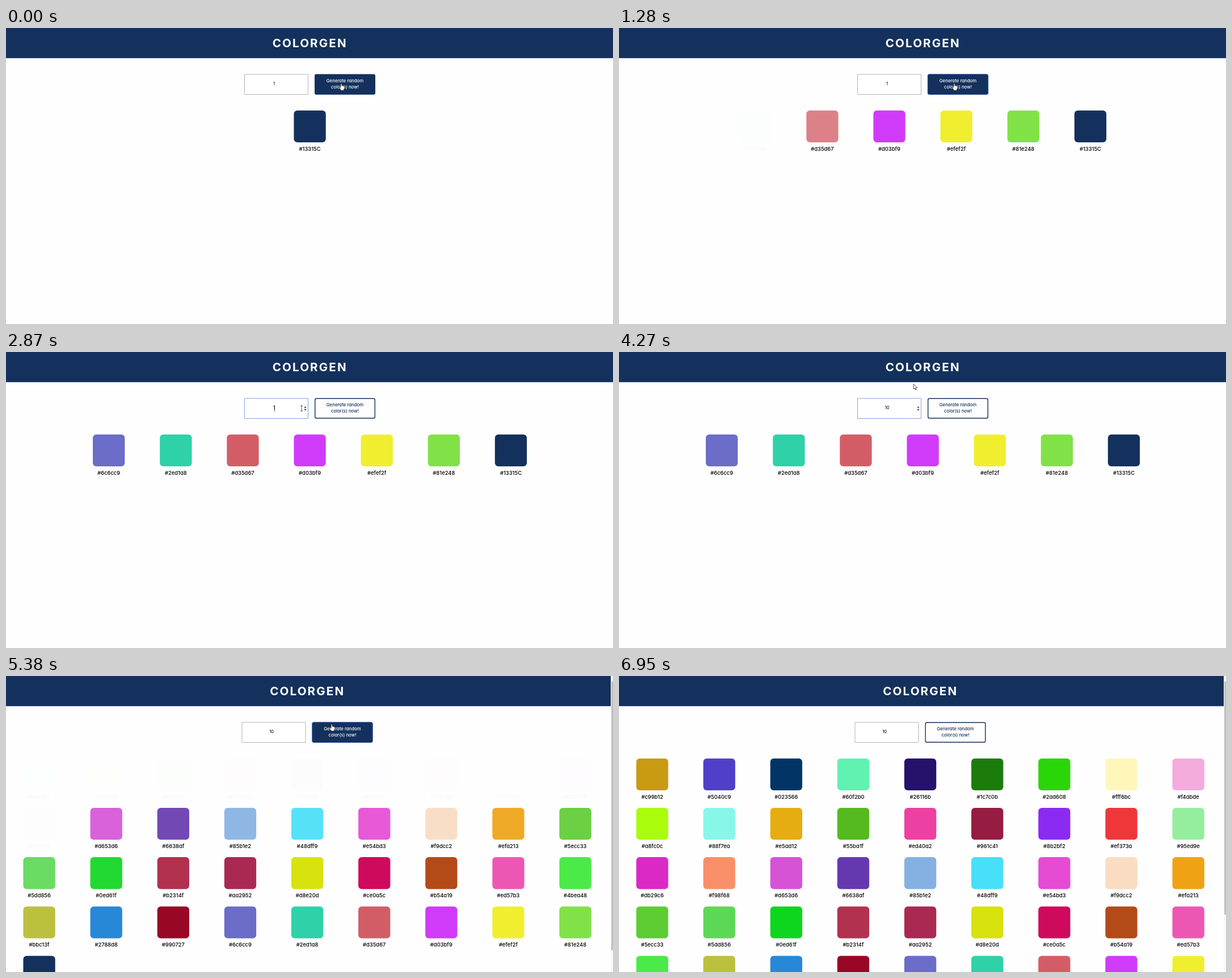
Animation of 1070 by 523 pixels, one loop 7.7 s. Source, as an HTML page with a canvas:

```html
<!DOCTYPE html>
<html lang="en">
<head>
<meta charset="utf-8">
<title>Colorgen</title>
<style>
  html, body { margin: 0; width: 100%; height: 100%; overflow: hidden; background: #fefefe; }
  #stage { position: relative; width: 1070px; height: 523px; overflow: hidden;
    font-family: Poppins, Inter, "Open Sans", sans-serif; font-feature-settings: "cv11"; }
  canvas, #page { position: absolute; left: 0; top: 0; }
  #page div { position: absolute; text-align: center; white-space: nowrap; }
  #title { left: 385.7px; top: 11.8px; width: 300px; line-height: 30px;
    font-size: 20.6px; font-weight: 700; letter-spacing: 2.1px; color: #fff; }
  #value { left: 422.6px; top: 93.3px; width: 100px; line-height: 12px; font-size: 7.4px; font-weight: 500; color: #111; }
  #action { left: 544px; top: 88.2px; width: 107px; line-height: 11.1px; font-size: 7.8px; font-weight: 500; }
  .label { left: -40px; top: 62.4px; width: 80px; line-height: 12px; font-size: 9.4px; font-weight: 500; color: #000; }
</style>
</head>
<body>
<div id="stage">
  <canvas id="back" width="1070" height="523"></canvas>
  <div id="page">
    <div id="title">COLORGEN</div>
    <div id="value">1</div>
    <div id="action">Generate random<br>color(s) now!</div>
  </div>
  <canvas id="front" width="1070" height="523"></canvas>
</div>
<script>
const LOOP = 7700, FADE = 480, W = 1070, H = 523;
const NAVY = [19, 49, 92], PAPER = [254, 254, 254];
const COL = 118.13, ROW = 87.15, SIZE = 56.3, TOP = 145.8, MID = 535.6;

// newest first, as listed on the page
const colors = (
  'c99b12 5040c9 023566 60f2b0 26116b 1c7c0b 2ad608 fff6bc f4abde a8fc0c ' +
  '88f7ea e5ad12 55ba1f ed40a2 961c41 8b2bf2 ef373a 95ed9e db29c6 f98f68 ' +
  'd653d6 6638af 85b1e2 48dff9 e54bd3 f9dcc2 efa213 5ecc33 5dd856 0ed61f ' +
  'b2314f aa2952 d8e20d ce0a5c b54a19 ed57b3 4bea48 bbc13f 2788d8 990727 ' +
  '6c6cc9 2ed1a8 d35d67 d03bf9 efef2f 81e248 13315C').split(' ').map(c => '#' + c);

// [time of click, number of swatches afterwards]
const clicks = [[-1000, 1], [120, 2], [385, 3], [650, 4], [910, 5], [1278, 6],
  [1645, 7], [4645, 17], [4940, 27], [5378, 37], [5770, 47]];

// [time, x, y] of the pointer tip
const path = [[0, 591, 98], [1700, 591, 98], [1860, 521, 99.5], [3995, 521, 99.5], [4010, 521, 97],
  [4150, 521, 97], [4265, 519, 56.5], [4310, 520, 57], [4490, 572, 84], [4930, 572, 84],
  [5200, 574, 85], [6765, 574, 85], [6950, 990, 530]];

const $ = id => document.getElementById(id);
const back = $('back').getContext('2d'), front = $('front').getContext('2d');
const clamp = v => Math.max(0, Math.min(1, v));
const mix = (a, b, k) => `rgb(${a.map((v, i) => Math.round(v + (b[i] - v) * k))})`;
const within = (t, a, b) => t >= a && t < b;

const labels = colors.map(c => {
  const el = document.createElement('div');
  el.className = 'label';
  el.textContent = c;
  return $('page').appendChild(el);
});
const births = colors.map((c, i) => clicks.find(k => k[1] >= colors.length - i)[0]);

function pointer(t) {
  const i = path.findIndex(p => p[0] > t);
  if (i < 0) return path[path.length - 1].slice(1);
  const a = path[i - 1], b = path[i], k = (t - a[0]) / (b[0] - a[0]);
  return [a[1] + (b[1] - a[1]) * k, a[2] + (b[2] - a[2]) * k];
}

function box(x, y, w, h, r, fill, stroke, line) {
  back.beginPath();
  back.roundRect(x, y, w, h, r);
  if (fill) { back.fillStyle = fill; back.fill(); }
  if (stroke) { back.strokeStyle = stroke; back.lineWidth = line; back.stroke(); }
}

function swatches(t, n) {
  const skip = colors.length - n, cols = Math.min(n, 9);
  const first = MID - (cols - 1) / 2 * COL;
  labels.forEach((el, i) => {
    const j = i - skip;
    el.hidden = j < 0;
    if (j < 0) return;
    const x = first + j % 9 * COL, y = TOP + Math.floor(j / 9) * ROW;
    const alpha = clamp((t - births[i]) / FADE);
    back.globalAlpha = alpha;
    box(x - SIZE / 2, y, SIZE, SIZE, 6, colors[i]);
    el.style.transform = `translate(${x}px, ${y}px)`;
    el.style.opacity = clamp(alpha * 4);
  });
  back.globalAlpha = 1;
}

function field(t) {
  const focus = within(t, 1880, 4630);
  const value = within(t, 3050, 3390) ? '' : t < 3480 ? '1' : '10';
  $('value').textContent = value;
  box(420.5, 82, 112, 35.5, 0, '#fff', focus ? '#7fa3e3' : '#b4b4b4', 1);
  if (within(t, 1815, 4630)) {
    box(525, 94, 5, 11, 0, '#efefef');
    back.fillStyle = '#333';
    for (const [y, d] of [[98.4, -2.2], [101, 2.2]]) {
      back.beginPath();
      back.moveTo(525.4, y);
      back.lineTo(529.6, y);
      back.lineTo(527.5, y + d);
      back.fill();
    }
  }
  if (within(t, 1880, 2380) || within(t, 2870, 3980) || within(t, 4480, 4630)) {
    const x = value === '10' ? 476.4 : value ? 473.2 : 472.3;
    back.fillStyle = '#111';
    back.fillRect(x, 94, 0.8, 11);
  }
}

function button(t) {
  const hover = t < 3000 ? 1 - clamp((t - 1800) / 90)
    : clamp((t - 4410) / 90) - clamp((t - 6785) / 100);
  box(544.7, 82.2, 105.6, 34.8, 2.5, mix(PAPER, NAVY, hover), mix(NAVY, NAVY, 0), 1.4);
  if (within(t, 120, 1800) || within(t, 4630, 6790))
    box(544.3, 81.8, 106.4, 35.6, 3, null, '#2f5aa8', 0.9);
  $('action').style.color = mix(NAVY, [255, 255, 255], hover);
}

function shape(points) {
  front.beginPath();
  points.forEach(([x, y]) => front.lineTo(x, y));
  front.closePath();
  front.fill();
  front.stroke();
}

function cursor(x, y, shift) {
  const row = y > 82 && y < 118;
  front.save();
  front.translate(x, y);
  front.lineJoin = 'round';
  front.fillStyle = '#fff';
  front.strokeStyle = '#222';
  front.lineWidth = 0.8;
  if (row && x > 544 + shift && x < 651 + shift) {
    shape([[-1, 0.6], [0, 0], [1, 0.6], [1.1, 4], [2.6, 4.1], [4, 4.5], [5.3, 5.1], [5.8, 6.2],
      [5.6, 8.6], [4.5, 10.5], [4.4, 12.2], [-0.9, 12.2], [-1.2, 10.8], [-3.6, 7.4], [-3.5, 6.3],
      [-2.4, 6.3], [-1, 7.4]]);
  } else if (row && x > 420 + shift && x < 533 + shift) {
    front.beginPath();
    for (const d of [-1, 1]) {
      front.moveTo(-2, d * 4.6);
      front.lineTo(2, d * 4.6);
    }
    front.moveTo(0, -4.6);
    front.lineTo(0, 4.6);
    front.stroke();
  } else {
    shape([[0, 0], [0, 9], [2.1, 7.1], [3.6, 10.4], [5, 9.8], [3.6, 6.6], [6.3, 6.4]]);
  }
  front.restore();
}

function draw(t) {
  const n = clicks.filter(c => c[0] <= t).pop()[1];
  const scroll = n >= 37, shift = scroll ? -4.5 : 0;
  back.fillStyle = mix(PAPER, PAPER, 0);
  back.fillRect(0, 0, W, H);
  back.fillStyle = mix(NAVY, NAVY, 0);
  back.fillRect(0, 0, scroll ? 1066 : W, 53.3);
  back.save();
  back.translate(shift, 0);
  $('page').style.transform = `translateX(${shift}px)`;
  field(t);
  button(t);
  swatches(t, n);
  back.restore();
  if (scroll) {
    box(1066, 0, 4, H, 0, '#f8f8f8');
    box(1067, 9.5, 3, n > 37 ? 412 : 475, 0, '#c1c1c1');
  }
  front.clearRect(0, 0, W, H);
  if (t < 6950) cursor(...pointer(t), shift);
}

const start = performance.now();
function tick() {
  draw((performance.now() - start) % LOOP);
  requestAnimationFrame(tick);
}
tick();
</script>
</body>
</html>
```
